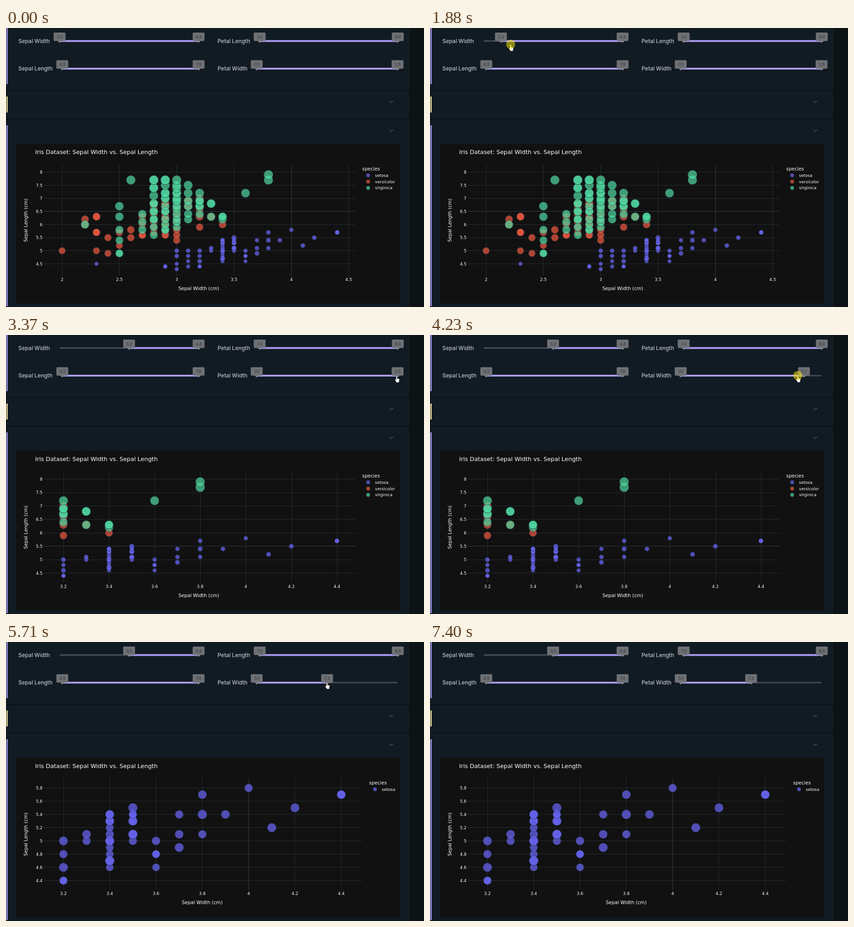
An HTML page for the animation above (7.73 s loop, 917x611 px).

```html
<!DOCTYPE html>
<html lang="en">
<head>
<meta charset="utf-8">
<title>Iris dashboard</title>
<style>
  html, body { margin: 0; width: 100%; height: 100%; overflow: hidden; background: #111b23; }
  svg { display: block; }
  .ui { font: 500 12px Inter, sans-serif; fill: #bfc2c5; }
  .tip { font: 9.5px Inter, sans-serif; letter-spacing: -.4px; fill: #34373a; text-anchor: middle; }
  .chart { font: 9px "DejaVu Sans", sans-serif; fill: #fff; }
  .chart .title { font-size: 12.8px; }
  .chart .name { font-size: 10.4px; }
  .mid { text-anchor: middle; }
  .end { text-anchor: end; }
  .dot { opacity: .7; stroke: #283442; stroke-width: .8; }
</style>
</head>
<body>
<svg id="stage" width="917" height="611" viewBox="0 0 917 611"></svg>
<script>
// Cluster outlines as [sepal width, lowest length, highest length] in millimetres.
// Columns between two ranges are interpolated; an entry without a highest length is a lone bubble.
const species = [
  { name: 'setosa', color: '#6c68fc', centre: 34, gap: 1, petal: y => 10 + .1 * y, scatter: 5, outline: [
    [23, 45], [29, 44], [30, 43, 50], [32, 44, 50], [33, 50, 51], [34, 46, 54], [35, 50, 55],
    [36, 46, 50], [38, 51, 57], [39, 54], [40, 58], [41, 52], [42, 55], [44, 57]] },
  { name: 'versicolor', color: '#ef5a40', centre: 29, gap: 1.6, petal: y => 1.9 + .686 * y, scatter: 3, outline: [
    [20, 50], [22, 60, 62], [23, 50, 63], [24, 49, 55], [26, 55, 58], [28, 57, 68],
    [30, 54, 67], [31, 67, 69], [32, 59, 70], [33, 63], [34, 60]] },
  { name: 'virginica', color: '#50d9a2', centre: 30, gap: 1.7, petal: y => 6.1 + .75 * y, scatter: 3, outline: [
    [22, 60], [25, 49, 67], [26, 77], [27, 58, 64], [28, 56, 77], [30, 59, 77],
    [32, 64, 72], [34, 62, 63], [36, 72], [38, 77, 79]] }
];

const mix = (a, b, k) => a + (b - a) * k;
const noise = (a, b) => {
  const v = Math.sin(a * 12.9898 + b * 78.233) * 43758.5453;
  return v - Math.floor(v);
};

// Spreads a column evenly, more loosely away from the cluster centre; some bubbles are doubled.
function fillColumn({ centre, gap, petal, scatter }, width, low, high = low) {
  const step = gap * (1 + .4 * Math.abs(width - centre));
  const parts = high > low ? Math.max(1, Math.round((high - low) / step)) : 0;
  const out = [];
  for (let i = 0; i <= parts; i++) {
    const length = Math.round(mix(low, high, parts && i / parts));
    const bubble = { width, length, size: petal(length) + scatter * (noise(width, length) - .5) };
    out.push(bubble);
    if (noise(length, width) > .75) out.push(bubble);
  }
  return out;
}

function bubbles(kind) {
  return kind.outline.flatMap(([width, low, high], i, all) => {
    const [nextWidth, nextLow, nextHigh] = all[i + 1] || [];
    const out = fillColumn(kind, width, low, high);
    if (high && nextHigh) {
      for (let w = width + 1; w < nextWidth; w++) {
        const k = (w - width) / (nextWidth - width);
        out.push(...fillColumn(kind, w, mix(low, nextLow, k), mix(high, nextHigh, k)));
      }
    }
    return out;
  });
}

// Axis ticks are [first, last, step]; "strong" are the brighter grid lines.
const views = [
  { minWidth: 0, kinds: 3, right: 766, largest: 69, xTicks: [20, 45, 5], yTicks: [45, 80, 5],
    strongX: 40, strongY: 65, x: v => 123 + (v - 20) * 25.15, y: v => 315.7 + (80 - v) * 5.737 },
  { minWidth: 32, kinds: 3, right: 766, largest: 67, xTicks: [32, 44, 2], yTicks: [45, 80, 5],
    strongY: 55, x: v => 126 + (v - 32) * 50, y: v => 315.9 + (80 - v) * 5.87 },
  { minWidth: 32, kinds: 1, right: 781, largest: 19, xTicks: [32, 44, 2], yTicks: [44, 58, 2],
    strongX: 40, x: v => 126 + (v - 32) * 50.79, y: v => 319.7 + (58 - v) * 14.486 }
];

const rect = (x, y, w, h, fill, more = '') =>
  `<rect x="${x}" y="${y}" width="${w}" height="${h}" fill="${fill}" ${more}/>`;
const text = (x, y, label, cls = '', more = '') =>
  `<text x="${x}" y="${y}" dy=".36em" class="${cls}" ${more}>${label}</text>`;
const line = (x1, y1, x2, y2, strong) =>
  `<path d="M${x1} ${y1}L${x2} ${y2}" stroke="${strong ? '#303a4b' : '#252b35'}"/>`;
const dot = (x, y, r, fill) => `<circle class="dot" cx="${x}" cy="${y}" r="${r}" fill="${fill}"/>`;
const crisp = v => Math.floor(v) + .5;

function ticks([first, last, step], draw) {
  let out = '';
  for (let v = first; v <= last; v += step) out += draw(v);
  return out;
}

function chart(view) {
  const { x, y, right } = view, legend = right + 15.5;
  let out = ticks(view.xTicks, v =>
      line(crisp(x(v)), 298, crisp(x(v)), 543, v === view.strongX) + text(x(v), 551, v / 10, 'mid'))
    + ticks(view.yTicks, v =>
      line(81, crisp(y(v)), right, crisp(y(v)), v === view.strongY) + text(80, y(v), v / 10, 'end'))
    + text((80 + right) / 2, 570, 'Sepal Width (cm)', 'name mid')
    + text(legend, 308, 'species', 'name');
  species.slice(0, view.kinds).forEach((kind, i) => {
    const rowY = 322.5 + 13.8 * i;
    for (const { width, length, size } of bubbles(kind)) {
      if (width < view.minWidth) continue;
      out += dot(x(width), y(length), 10.5 * Math.sqrt(size / view.largest), kind.color);
    }
    out += dot(legend + 13, rowY, 4.4, kind.color) + text(legend + 28, rowY, kind.name);
  });
  return `<g class="view">${out}</g>`;
}

const handle = (x, y, value, id = '') =>
  `<g id="${id}" transform="translate(${x} ${y})"><path d="M-5 -1h10l-5 5z" fill="#8b8b91"/>`
  + rect(-13, -18.5, 26, 18.5, '#6e7174', 'rx="2"') + text(0, -9, value, 'tip') + '</g>';

const slider = (label, labelX, y, left, right, low, high, lowId, highId) =>
  text(labelX, y, label, 'ui')
  + rect(left, y - 1.5, right - left, 3, '#484a5b', 'rx="1.5"')
  + rect(left, y - 2, right - left, 4, '#ab9df2', lowId || highId ? `id="range-${lowId || highId}"` : '')
  + handle(left, y, low, lowId) + handle(right, y, high, highId);

const bar = (y, height, color) => rect(1, y, 2.6, height, color);
const chevron = y =>
  `<path d="M841.5 ${y - 2}l3.7 3.7 3.7-3.7" fill="none" stroke="#505b63" stroke-width="1.3"/>`;

const $ = id => document.getElementById(id);
$('stage').innerHTML =
  rect(0, 0, 917, 611, '#111b23') + rect(885, 0, 32, 611, '#0d1215')
  + rect(0, 136, 885, 1.5, '#0a1116') + rect(0, 198.5, 885, 1.5, '#0a1116')
  + bar(0, 123, '#ab9df2') + bar(150, 35, '#f2dfa0') + bar(213, 396, '#ab9df2')
  + chevron(162) + chevron(225)
  + slider('Sepal Width', 27, 28.5, 117.5, 422.5, '2.0', '4.4', 'low', '')
  + slider('Sepal Length', 27, 89, 123.5, 422.5, '4.3', '7.9')
  + slider('Petal Length', 464, 28.5, 556.5, 859.5, '1.0', '6.9')
  + slider('Petal Width', 464, 89, 550, 859, '0.1', '2.5', '', 'high')
  + rect(22, 254, 843, 349, '#111')
  + '<g class="chart">' + text(64, 271.5, 'Iris Dataset: Sepal Width vs. Sepal Length', 'title')
  + text(0, 0, 'Sepal Length (cm)', 'name mid', 'transform="translate(43.5 421) rotate(-90)"')
  + views.map(chart).join('') + '</g>'
  + `<g id="cursor">
     <path id="arrow" d="M0 0v11l2.6-2.3 1.8 4 1.8-.8-1.8-3.9h3.5z" fill="#fff" stroke="#000" stroke-width=".5"/>
     <path id="hand" d="M-1.3 1Q0-1 1.3 1V6l4 .9q1.2.4 1 2L5.3 12.5V15H-1.2V13L-4.3 9q0-2 3 0z"
       fill="#fff" stroke="#000" stroke-width=".6"/>
     <circle id="press" r="10" fill="#ffef00" opacity=".5"/></g>`;

// Eased pointer moves: [begin, end, x, y].
const moves = [
  [120, 810, 183, 36], [850, 1010, 114, 31],
  [1580, 2170, 236, 40], [2220, 2620, 281, 48],
  [2690, 2900, 807, 87], [2950, 3370, 857, 89],
  [3840, 4860, 704, 88],
  [6450, 6900, 700, 592], [6900, 7330, 844, 224]
];
const ease = k => k * k * (3 - 2 * k);
function pointer(t) {
  let x = 852, y = 511;
  for (const [begin, end, toX, toY] of moves) {
    const k = ease(Math.min(Math.max((t - begin) / (end - begin), 0), 1));
    x = mix(x, toX, k);
    y = mix(y, toY, k);
  }
  return [x, y];
}

// Handles trail the pointer and snap to tenths of a unit.
const LAG = 80;
const dragged = (t, from, to) => pointer(Math.min(Math.max(t - LAG, from), to))[0];
const show = (node, on) => node.style.display = on ? '' : 'none';
const between = (t, a, b) => t >= a && t < b;

function moveHandle(id, x, y, tenths) {
  $(id).setAttribute('transform', `translate(${x} ${y})`);
  $(id).querySelector('text').textContent = (tenths / 10).toFixed(1);
}

const charts = document.querySelectorAll('.view');
function render(t) {
  const low = Math.max(20, Math.round(20 + (dragged(t, 1410, 2490) - 117.5) / 12.71));
  const lowX = 117.5 + (low - 20) * 12.71;
  moveHandle('low', lowX, 28.5, low);
  $('range-low').setAttribute('x', lowX);
  $('range-low').setAttribute('width', 422.5 - lowX);

  const high = Math.min(25, Math.round(1 + (dragged(t, 3840, 4900) - 550) / 12.875));
  const highX = 550 + (high - 1) * 12.875;
  moveHandle('high', highX, 89, high);
  $('range-high').setAttribute('width', highX - 550);

  const current = t < 3300 ? 0 : t < 5710 ? 1 : 2;
  charts.forEach((node, i) => show(node, i === current));

  const hand = between(t, 940, 6580);
  show($('cursor'), between(t, 120, 7400));
  show($('hand'), hand);
  show($('arrow'), !hand);
  show($('press'), between(t, 1410, 2600) || between(t, 3840, 4990));
  $('cursor').setAttribute('transform', `translate(${pointer(t)})`);
}

const start = performance.now();
(function tick() {
  render((performance.now() - start) % 7730);
  requestAnimationFrame(tick);
})();
</script>
</body>
</html>
```
